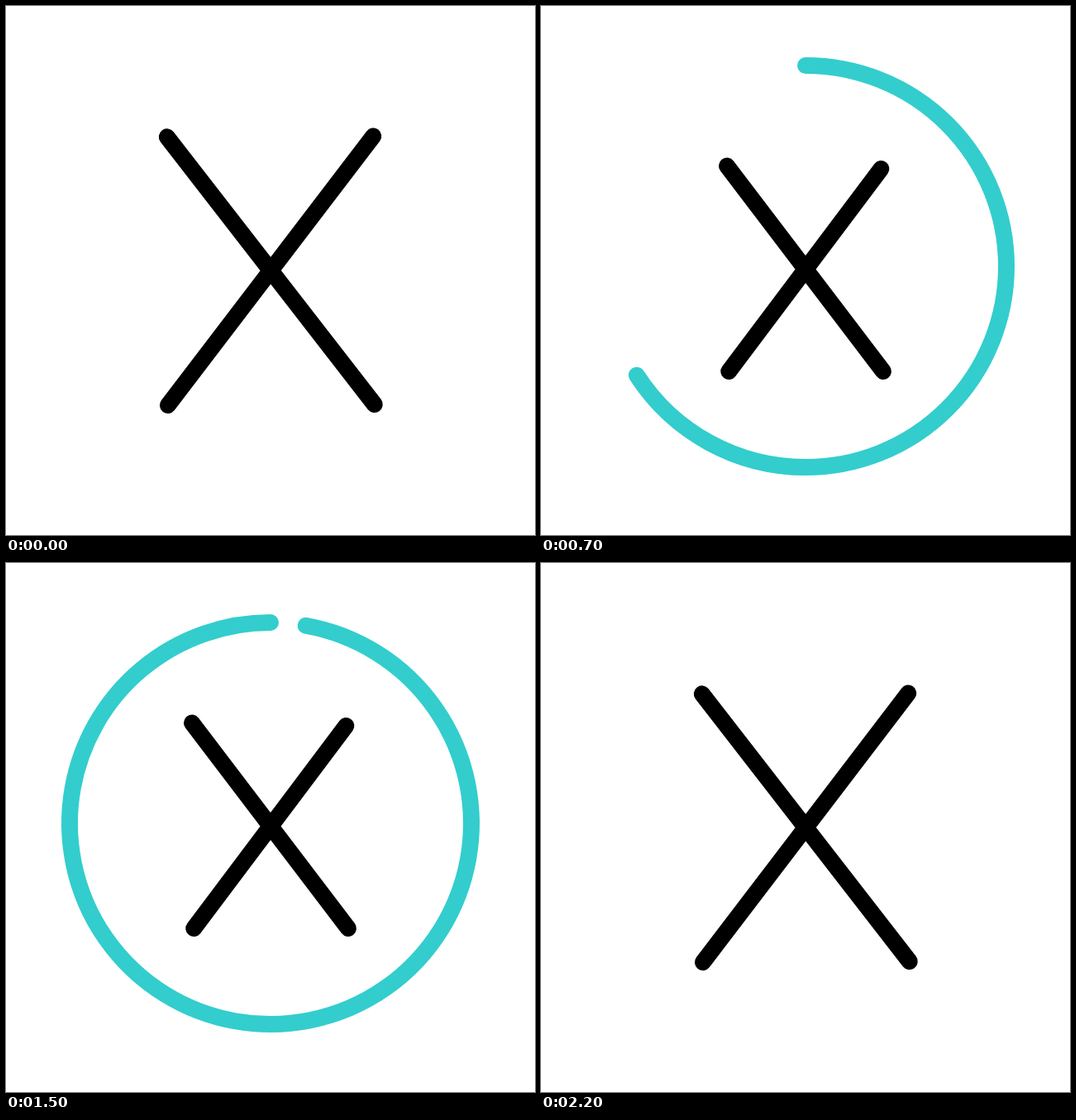
Write an HTML page with a canvas that moves like this. It is 640 by 640 pixels and loops after 2.6 s.

```html
<!DOCTYPE html>
<html lang="en">
<head>
<meta charset="utf-8">
<title>Close</title>
<style>
html, body { margin: 0; width: 100%; height: 100%; overflow: hidden; background: #fff; }
canvas { display: block; width: 640px; height: 640px; }
</style>
</head>
<body>
<canvas id="stage" width="640" height="640"></canvas>
<script>
const ctx = document.getElementById('stage').getContext('2d');
const LOOP = 2600, STEP = 20;
const INK = '#000', TEAL = '#33cdcd';

// Each stroke is [x1, y1, x2, y2].
const LARGE = [[194.8, 158.3, 445.8, 482], [444.3, 157.5, 195.9, 483]];
const SMALL = [[225, 193.5, 414, 442], [411.4, 197, 227.3, 442]];
const SWEEP = [[227, 196, 413, 440.5], [229, 439.5, 411, 199]];

// Smooth progress from 0 to 1 between two times.
function ease(t, from, to) {
  const u = Math.min(1, Math.max(0, (t - from) / (to - from)));
  return u * u * (3 - 2 * u);
}

const mix = (a, b, k) => a + (b - a) * k;

function line([x1, y1, x2, y2], color, start = 0, end = 1) {
  if (end <= start) return;
  ctx.strokeStyle = color;
  ctx.beginPath();
  ctx.moveTo(mix(x1, x2, start), mix(y1, y2, start));
  ctx.lineTo(mix(x1, x2, end), mix(y1, y2, end));
  ctx.stroke();
}

function ring(start, end) {
  if (end <= start) return;
  const angle = k => (k * 2 - 0.5) * Math.PI;
  ctx.strokeStyle = TEAL;
  ctx.beginPath();
  ctx.arc(320, 315, 243, angle(start), angle(end));
  ctx.stroke();
}

function draw(t) {
  ctx.fillStyle = '#fff';
  ctx.fillRect(0, 0, 640, 640);
  ctx.lineWidth = 20;
  ctx.lineCap = 'round';

  const shrink = ease(t, 67, 500) - ease(t, 1767, 2200);
  LARGE.forEach((s, i) => line(s.map((v, j) => mix(v, SMALL[i][j], shrink)), INK));

  const start = ease(t, 1135, 1435), end = ease(t, 798, 1098);
  SWEEP.forEach(s => line(s, TEAL, start, end));

  ring(ease(t, 1440, 2039), ease(t, 234, 1001));
}

const t0 = performance.now();
function tick() {
  const t = (performance.now() - t0) % LOOP;
  draw(Math.floor(t / STEP) * STEP);
  requestAnimationFrame(tick);
}
tick();
</script>
</body>
</html>
```
